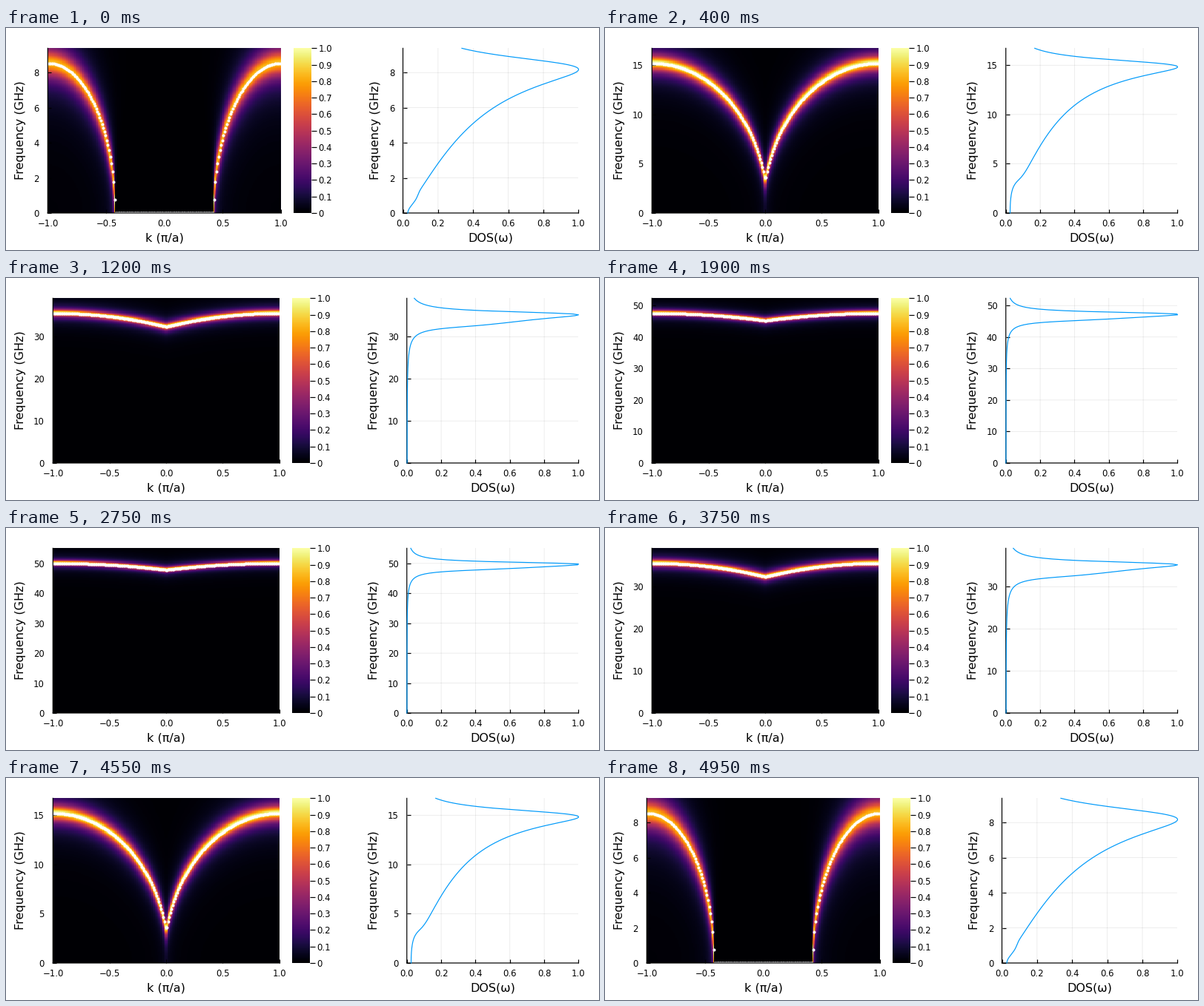
Animation of 800 by 300 pixels, one loop 5 s. Source, as a matplotlib script:

```python
import numpy as np
import matplotlib.pyplot as plt
from matplotlib.animation import FuncAnimation

W, H, DPI = 800, 300, 100
FRAMES, INTERVAL = 100, 50
TOP, BOTTOM, RIGHT = 27.4, 250, 772.4
PX = 72 / DPI
LINE = 1.2 * PX
TICK_SIZE, LABEL_SIZE = 11.6 * PX, 16 * PX

GAMMA = 0.7      # half linewidth in GHz
COUPLING = 220   # band width in GHz^2
k = np.linspace(-1, 1, 200)
ROWS = 200

plt.rcParams["font.family"] = "DejaVu Sans"
plt.rcParams["path.snap"] = False
fig = plt.figure(figsize=(W / DPI, H / DPI), dpi=DPI, facecolor="white")


def place(ax, left, right):
    ax.set_position([left / W, 1 - BOTTOM / H, (right - left) / W, (BOTTOM - TOP) / H])


def style(ax):
    for side in ("top", "right"):
        ax.spines[side].set_visible(False)
    for side in ("left", "bottom"):
        ax.spines[side].set_linewidth(LINE)
    ax.tick_params(direction="in", length=5 * PX, width=LINE, labelsize=TICK_SIZE)
    ax.tick_params(axis="x", pad=8 * PX)
    ax.tick_params(axis="y", pad=11.3 * PX)


def label(text, x, y, rotation=0):
    return fig.text(x / W, 1 - y / H, text, size=LABEL_SIZE, rotation=rotation,
                    ha="center", va="center")


band_ax, bar_ax, dos_ax = (fig.add_axes([0, 0, 1, 1]) for _ in range(3))

style(band_ax)
band_ax.set_xticks(np.linspace(-1, 1, 5))
heat = band_ax.imshow(np.zeros((ROWS, k.size)), cmap="inferno", vmin=0, vmax=1,
                      origin="lower", aspect="auto", interpolation="nearest")
dots, = band_ax.plot([], [], "o", color="white", ms=4 * PX, mew=0)

bar_ax.imshow(np.linspace(0, 1, 256)[:, None], cmap="inferno", origin="lower",
              aspect="auto", extent=(0, 1, 0, 1))
bar_ax.set_xticks([])
levels = np.linspace(0, 1, 11)
bar_ax.set_yticks(levels, ["0"] + [f"{v:.1f}" for v in levels[1:]])
bar_ax.yaxis.tick_right()
bar_ax.tick_params(length=7 * PX, width=LINE, pad=2.4 * PX, labelsize=TICK_SIZE)
for spine in bar_ax.spines.values():
    spine.set_visible(False)

style(dos_ax)
dos_ax.set_xlim(0, 1)
dos_ax.set_xticks(np.linspace(0, 1, 6))
dos_ax.grid(color="black", alpha=0.1, lw=0.5)
dos_ax.set_axisbelow(True)
curve, = dos_ax.plot([], [], color="#009afa", lw=LINE, zorder=5, clip_on=False)

mid = (TOP + BOTTOM) / 2 - 0.5
label("Frequency (GHz)", 19.2, mid, 90)
dos_ylabel = label("Frequency (GHz)", 498.5, mid, 90)
k_label = label("k (π/a)", 214, 284)
dos_label = label("DOS(ω)", 654, 284)


def tick_step(top):
    for limit, step in ((10, 2), (15, 2.5), (30, 5)):
        if top < limit:
            return step
    return 10


def layout(step):
    # wider tick labels push the axes inwards
    shift = {2: 0, 2.5: 17.5}.get(step, 7)
    inner = shift * 2 / 7
    left, right = 56.3 + shift, 371.3 - inner
    dos_left = 535.5 + shift * 0.75
    place(band_ax, left, right)
    place(bar_ax, right + 16.5, right + 40.5)
    place(dos_ax, dos_left, RIGHT)
    k_label.set_x((left + right) / 2 / W)
    dos_label.set_x((dos_left + RIGHT) / 2 / W)
    dos_ylabel.set_x((498.5 - inner) / W)


def update(i):
    peak = 72.8 + 1254 * (1 - np.cos(2 * np.pi * i / (FRAMES - 1)))
    square = peak - COUPLING * (1 - np.abs(k))**2
    top = 1.1 * np.sqrt(peak)
    freq = np.linspace(0, top, ROWS)

    # damped response of every mode, unstable ones (square < 0) included
    z = freq[:, None] + 1j * GAMMA
    response = -2 * GAMMA * (z / (z**2 - square)).imag
    dos = response.sum(axis=1)

    half = top / (ROWS - 1) / 2
    heat.set_data(response / response.max())
    heat.set_extent((-1.005, 1.005, -half, top + half))
    dots.set_data(k, np.sqrt(np.maximum(square, 0)))
    curve.set_data(np.maximum(dos / dos.max(), 0), freq)

    step = tick_step(top)
    ticks = np.arange(0, top, step)
    names = [f"{t:.1f}" if step == 2.5 else f"{t:.0f}" for t in ticks]
    for ax in (band_ax, dos_ax):
        ax.set_yticks(ticks, names)
        ax.set_ylim(0, top)
    band_ax.set_xlim(-1.005, 1.005)
    layout(step)
    return heat, dots, curve


anim = FuncAnimation(fig, update, frames=FRAMES, interval=INTERVAL,
                     init_func=lambda: update(0), repeat=True, repeat_delay=0)
plt.show()
```
